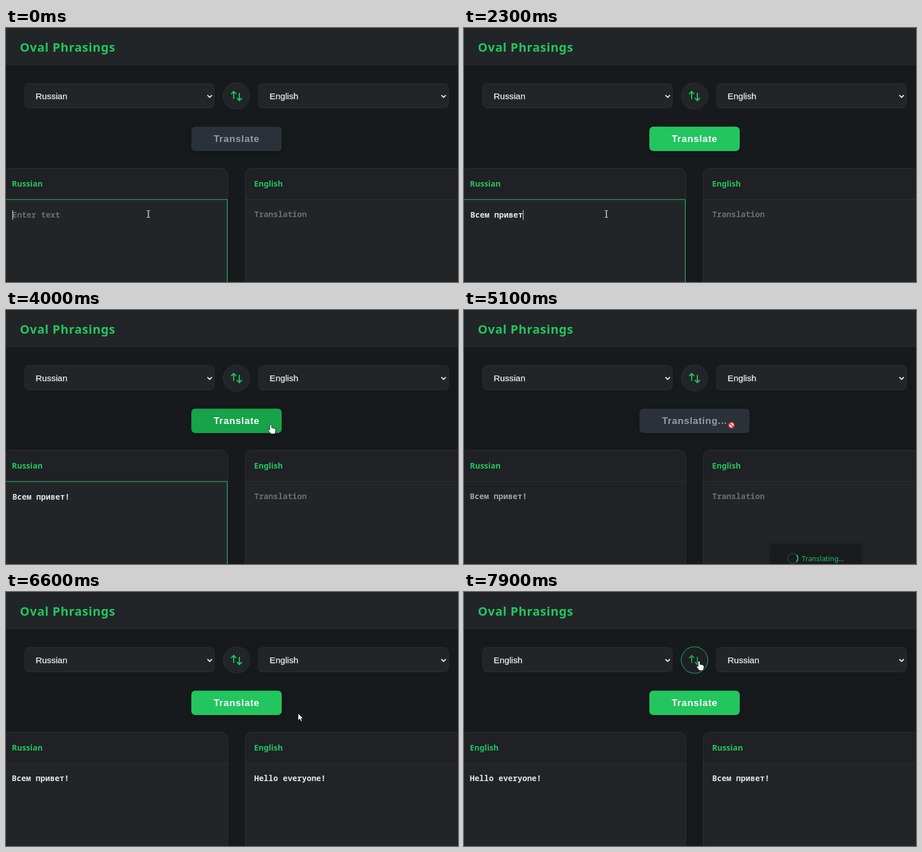
An HTML page that plays this animation: 800x450 px, repeating every 8000 ms.

```html
<!DOCTYPE html>
<html lang="en">
<head>
<meta charset="utf-8">
<title>Oval Phrasings</title>
<style>
  html, body { margin: 0; height: 100%; overflow: hidden; background: #171a1d; }
  svg { display: block; width: 800px; height: 450px; }
  text { white-space: pre; }
  .box { fill: #222528; stroke: #2c3034; }
  .panel { fill: #1f2124; stroke: #2c3034; }
  .green { fill: #22c55e; }
  .line { fill: none; stroke: #22c55e; }
  .title { font: 600 21.6px "Noto Sans", sans-serif; letter-spacing: .6px; }
  .label { font: 600 14.1px "Noto Sans", sans-serif; }
  .select { font: 15.5px "Liberation Sans", Arial, sans-serif; fill: #f0f1f2; stroke: #f0f1f2; stroke-width: .25; }
  .btn { font: bold 17px "Liberation Sans", Arial, sans-serif; letter-spacing: .75px; text-anchor: middle; }
  .mono { font: 600 14.1px "Noto Sans Mono", monospace; }
  .toast { font: 500 12.4px "Noto Sans", sans-serif; }
  .chevron { fill: none; stroke: #eee; stroke-width: 1.8; }
  .shadow { filter: drop-shadow(0 2px 4px #0004); }
  .pointer { fill: #fff; stroke: #000; stroke-width: .7; stroke-linejoin: round; }
</style>
</head>
<body>
<svg viewBox="0 0 800 450">
  <rect width="800" height="66" fill="#222528"/>
  <text class="title green" x="24.5" y="42">Oval Phrasings</text>

  <rect class="box" x="33.5" y="98.5" width="335" height="43" rx="7"/>
  <rect class="box" id="select" x="447" y="98.5" width="336" height="43" rx="7"/>
  <text class="select" id="from" x="52.600" y="126"></text>
  <text class="select" id="to" x="466.600" y="126"></text>
  <path class="chevron" d="M356.5 119l4 4 4-4M770.5 119l4 4 4-4"/>

  <circle class="box" id="swap" cx="408" cy="120.5" r="23.5"/>
  <path class="line" id="arrows" stroke-width="2" d="M403 125.500V112.500M398.500 117l4.500-4.500 4.500 4.500M413 115v13.500M408.500 124l4.500 4.500 4.500-4.500"/>

  <rect class="shadow" id="button" y="174.700" height="43.300" rx="7"/>
  <text class="btn" id="caption" x="408.100" y="202"></text>

  <rect class="panel" x="-5.500" y="248.500" width="398" height="300" rx="12"/>
  <rect class="panel" x="423.500" y="248.500" width="398" height="300" rx="12"/>
  <rect id="area" x="-5" y="304" width="397" height="200"/>
  <rect x="424" y="304" width="397" height="200" fill="#222528"/>
  <path stroke="#2c3034" d="M-5 303.500H392M424 303.500H800"/>
  <path class="line" id="focus" d="M-5 303.900H391.500V460"/>
  <text class="label green" id="fromLabel" x="10.300" y="281"></text>
  <text class="label green" id="toLabel" x="439" y="281"></text>
  <text class="mono" id="input"></text>
  <text class="mono" id="output" x="439.200" y="335"></text>
  <rect id="caret" y="323" width="1" height="17" fill="#eee"/>

  <g id="toast">
    <rect class="shadow" x="541.500" y="414" width="162.500" height="60" rx="7" fill="#181b1e"/>
    <circle cx="582" cy="440" r="9" fill="none" stroke="#2f3439" stroke-width="2"/>
    <path class="line" id="spinner" stroke-width="2" d="M575.640 433.640A9 9 0 0 1 588.360 433.640"/>
    <text class="toast green" x="598" y="445">Translating...</text>
  </g>

  <g id="cursor">
    <path id="beam" fill="none" stroke="#ddd" d="M-3-5.500h2q1 0 1 1v10q0 1-1 1h-2M3-5.500h-2q-1 0-1 1v10q0 1 1 1h2"/>
    <path id="arrow" class="pointer" d="M0 0V12.500L3 9.800 5 14.300 7.100 13.300 5.200 9H8.800Z"/>
    <path id="hand" class="pointer" d="M-1.600 1Q0-1 1.600 1V5.500L7.200 7Q9 7.800 8.700 11L7.300 16.500H.400L-4.200 10.500Q-4.600 8.200-2.900 8.400L-1.600 9.700Z"/>
    <g id="stop">
      <circle r="5.600" fill="#fff"/>
      <path fill="none" stroke="#d01f27" stroke-width="1.900" d="M-3.500-3.500A4.950 4.950 0 1 1 3.500 3.500A4.950 4.950 0 1 1-3.500-3.500L3.500 3.500"/>
    </g>
  </g>
</svg>
<script>
const LOOP = 8000, CLICK = 4800, DONE = 6000, SWAP = 7900, PITCH = 8.46;
const RU = 'Всем привет!', EN = 'Hello everyone!';
const $ = {};
document.querySelectorAll('[id]').forEach(e => $[e.id] = e);

const off = [42, 49, 57], on = [34, 197, 94], hover = [22, 163, 74];
const grey = [150, 155, 160], white = [255, 255, 255];
const buttonKeys = [[600, off], [800, [39, 161, 84]], [900, on], [3500, on], [3800, hover],
  [4700, hover], [5000, off], [5900, off], [6200, on]];
const captionKeys = [[600, grey], [800, [224, 227, 229]], [900, white],
  [4700, white], [5000, grey], [5900, grey], [6200, white]];
const mouseKeys = [[2400, [252, 329]], [2900, [510, 304]], [3000, [510, 304]], [3700, [468.5, 203]],
  [4700, [468.5, 203]], [5100, [473.3, 204]], [5900, [473.3, 204]], [6400, [510, 212]], [6600, [517, 215]],
  [6800, [518, 200]], [6900, [518, 200]], [7200, [470, 128]], [7500, [416, 122.5]]];

function tween(keys, t) {
  const i = keys.findIndex(k => k[0] > t);
  if (i < 0) return keys[keys.length - 1][1];
  if (i === 0) return keys[0][1];
  const [t0, a] = keys[i - 1], [t1, b] = keys[i];
  return a.map((v, j) => v + (b[j] - v) * (t - t0) / (t1 - t0));
}
const rgb = c => `rgb(${c.map(Math.round)})`;
const show = (e, yes) => e.style.display = yes ? '' : 'none';
const set = (e, attrs) => { for (const k in attrs) e.setAttribute(k, attrs[k]); };

function typed(t) {
  if (t < 1600) return [700, 1100, 1400].filter(s => t >= s).length;
  return Math.min(RU.length, 3 + Math.floor((t - 1500) / 100));
}

function drawText(t, busy) {
  const n = typed(t), focused = t < CLICK, swapped = t >= SWAP;
  const langs = swapped ? ['English', 'Russian'] : ['Russian', 'English'];
  $.from.textContent = $.fromLabel.textContent = langs[0];
  $.to.textContent = $.toLabel.textContent = langs[1];

  $.input.textContent = swapped ? EN : n ? RU.slice(0, n) : 'Enter text';
  set($.input, { x: focused ? 11.2 : 10.2, y: focused ? 336 : 335,
    fill: !n ? '#6c6e70' : busy ? '#a0a2a4' : '#e4e5e6' });
  $.output.textContent = t < DONE ? 'Translation' : swapped ? RU : EN;
  set($.output, { fill: t < DONE ? '#6c6e70' : '#e4e5e6' });

  const blink = t < 700 ? t < 300 : t < 2500 || Math.floor(t / 500) % 2 === 1;
  show($.caret, focused && blink);
  set($.caret, { x: 11.3 + n * PITCH });
  show($.focus, focused);
  set($.area, { fill: busy ? '#202225' : '#222528' });
}

function drawButton(t, busy) {
  const w = busy ? 195 : 160;
  set($.button, { x: 408 - w / 2, width: w, fill: rgb(tween(buttonKeys, t)) });
  $.caption.textContent = busy ? 'Translating...' : 'Translate';
  set($.caption, { fill: rgb(tween(captionKeys, t)) });
  show($.toast, busy);
  set($.spinner, { transform: `rotate(${(t - 4850) * .36} 582 440)` });
}

function drawMouse(t, busy) {
  const [x, y] = tween(mouseKeys, t);
  const overSwap = Math.hypot(x - 408, y - 120.5) < 24;
  const overSelect = x > 447 && x < 783 && y > 98 && y < 142;
  const overButton = Math.abs(x - 408) < (busy ? 97 : 80) && y > 174 && y < 218;
  const overText = y > 304 && (x < 392 || x > 424);
  const kind = overButton && busy ? 'stop' : overButton || overSwap || overSelect ? 'hand'
    : overText ? 'beam' : 'arrow';
  for (const k of ['beam', 'arrow', 'hand', 'stop']) show($[k], k === kind);
  set($.cursor, { transform: `translate(${x} ${y})` });
  $.select.style.stroke = overSelect ? '#22c55e' : '';
  $.swap.style.stroke = overSwap ? '#22c55e' : '';
  $.swap.style.fill = overSwap ? '#1d2023' : '';
  $.arrows.style.stroke = overSwap ? '#1da04d' : '';
}

const start = performance.now();
function frame(now) {
  const t = Math.floor(Math.max(0, now - start) % LOOP / 100) * 100;
  const busy = t >= CLICK && t < DONE;
  drawText(t, busy);
  drawButton(t, busy);
  drawMouse(t, busy);
  requestAnimationFrame(frame);
}
frame(start);
</script>
</body>
</html>
```
